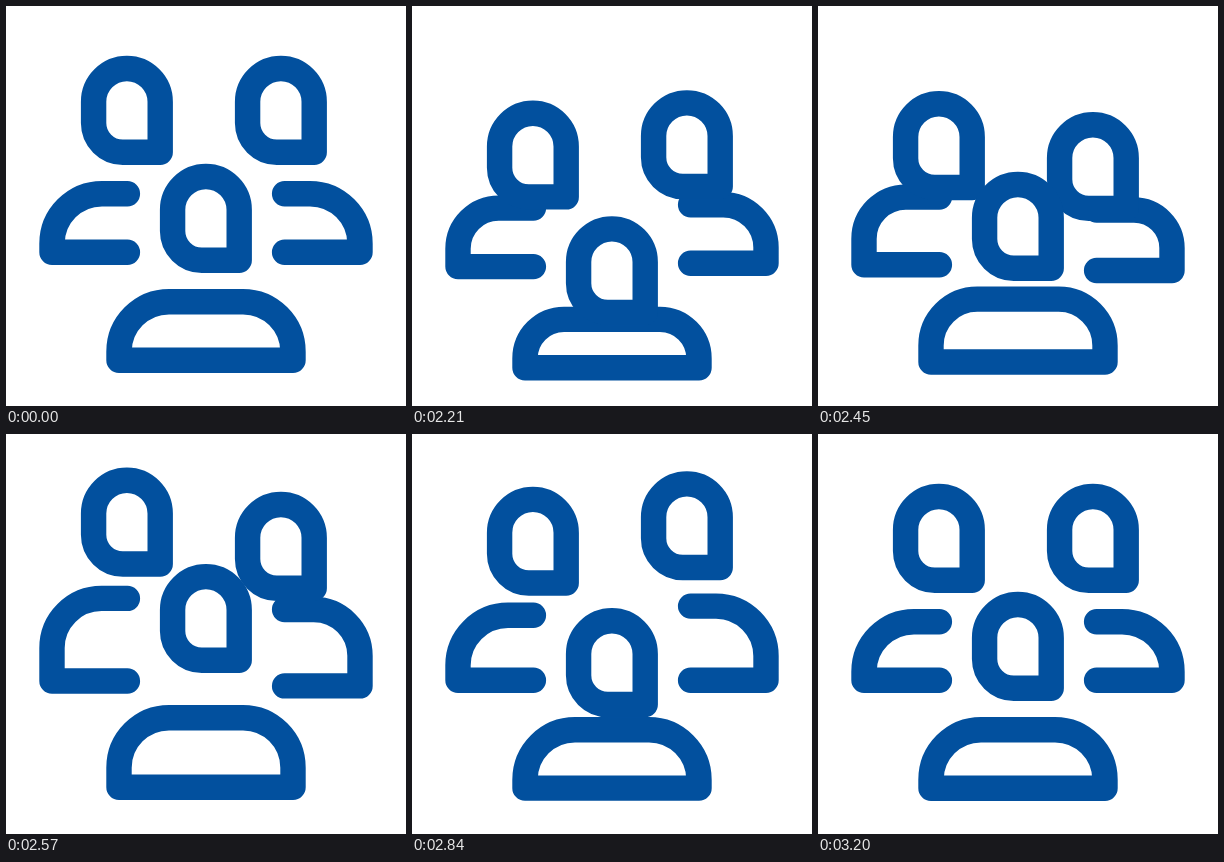
Recreate the animation shown at these times as an HTML page. Size 400 by 400 pixels, loop 3.23 s.

```html
<!DOCTYPE html>
<html lang="en">
<head>
<meta charset="utf-8">
<title>Jumping group</title>
<style>
  html, body { margin: 0; height: 100%; overflow: hidden; background: #fff; }
  svg { display: block; width: 100%; height: 100%; }
  path { fill: none; stroke: #02509e; stroke-width: 25.4; stroke-linecap: round; stroke-linejoin: round; }
</style>
</head>
<body>
<svg viewBox="0 0 400 400"></svg>
<script>
const LOOP = 3230, START = 2000, STEP = 30, END = 40;
const HEAD = 'M154.2 146.2V95.8A33.3 33.3 0 0 0 87.6 95.8V117A29.2 29.2 0 0 0 116.8 146.2Z';
const svg = document.querySelector('svg');

// drop: step of the deepest crouch, delay: lag of the jump behind the front person
const people = [
  { x: 0, y: 0, drop: 11, delay: 2, top: [20, -25, 3], bottom: [20, 0, 0], body: sideBody },
  { x: 154, y: 0, drop: 13.5, delay: 4, top: [20, -25, 3], bottom: [20, 0, 0], body: sideBody, flip: true },
  { x: 79, y: 108, drop: 9.5, delay: 0, top: [21, -12, 1], bottom: [9, -1, 0], body: frontBody }
];

function addPath(d, transform) {
  const path = document.createElementNS('http://www.w3.org/2000/svg', 'path');
  path.setAttribute('d', d);
  path.setAttribute('transform', transform);
  return svg.appendChild(path);
}

for (const p of people) {
  p.torso = addPath('', p.flip ? 'matrix(-1 0 0 1 400 0)' : '');
  p.head = addPath(HEAD, '');
}

function sideBody(top, bottom, r) {
  const y = 187.7 + top;
  return `M121.4 ${y}H${46 + r}A${r} ${r} 0 0 0 46 ${y + r}V${246.2 + bottom}H121.4`;
}

function frontBody(top, bottom, r) {
  const y = 295.7 + top;
  return `M113 ${354.2 + bottom}V${y + r}A${r} ${r} 0 0 1 ${113 + r} ${y}` +
    `H${287 - r}A${r} ${r} 0 0 1 287 ${y + r}V${354.2 + bottom}Z`;
}

function ramp(n, from, to) {
  const u = Math.min(1, Math.max(0, (n - from) / (to - from)));
  return u * u * (3 - 2 * u);
}

// Crouch, leap, land, then settle back to rest
function jump(n, p, [crouch, leap, land], apex, landing) {
  if (n < 1 || n >= END) return 0;
  const m = n - p.delay;
  return crouch * ramp(n, -0.5, p.drop)
    + (leap - crouch) * ramp(m, 9.5, apex)
    + (land - leap) * ramp(m, 20.5, landing)
    - land * ramp(n, landing + p.delay, END);
}

function draw() {
  const n = Math.floor((performance.now() % LOOP - START) / STEP);
  for (const p of people) {
    const body = keys => jump(n, p, keys, 18, 29.5);
    const lift = jump(n, p, [62, -28, 22], 19.2, 30);
    p.head.setAttribute('transform', `translate(${p.x} ${p.y + lift})`);
    p.torso.setAttribute('d', p.body(body(p.top), body(p.bottom), 50 - body([13, 0, 0])));
  }
  requestAnimationFrame(draw);
}
draw();
</script>
</body>
</html>
```
